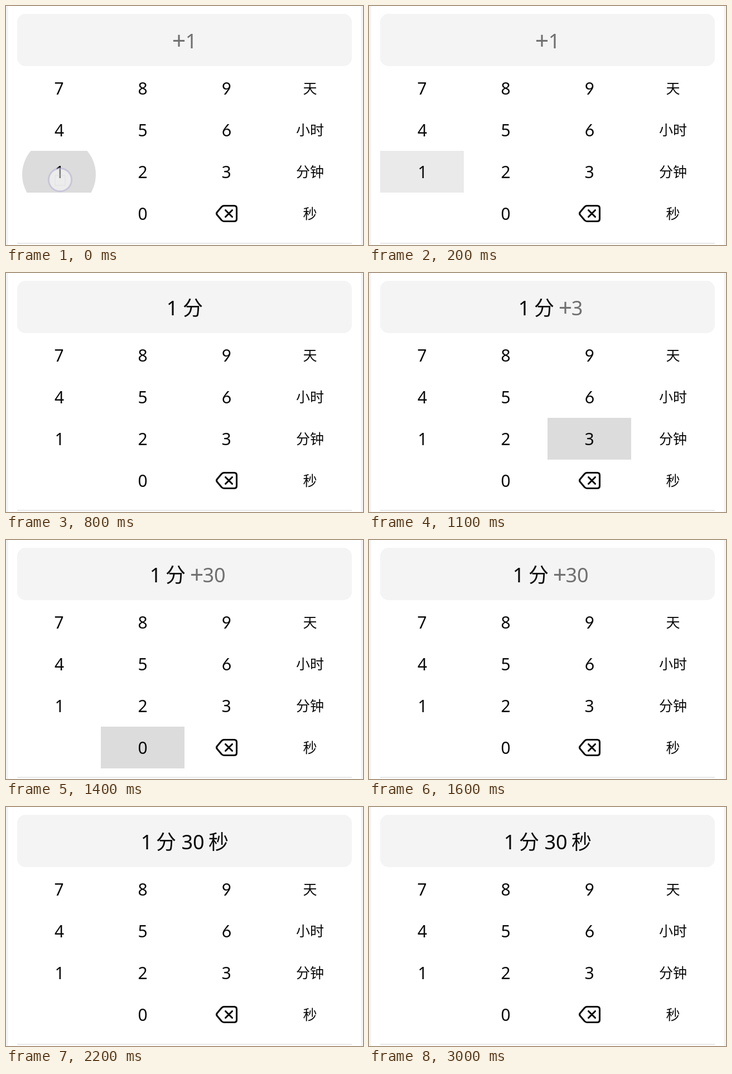
Animation, 640 px wide and 429 px high, one loop 3.1 s. Source, as an HTML page:

```html
<!DOCTYPE html>
<html lang="zh-CN">
<head>
<meta charset="utf-8">
<title>Duration keypad</title>
<style>
  html, body { margin: 0; width: 100%; height: 100%; overflow: hidden; background: #fff; }
  svg { display: block; }
  #stage { width: 100vw; height: 100vh; }

  text { text-anchor: middle; fill: #0a0a0a; font-family: "Noto Sans", "Open Sans", "Noto Sans CJK SC", sans-serif; }
  .cjk { font-family: "Noto Sans CJK SC", "Noto Sans CJK", sans-serif; }
  .keys text { font-size: 30px; }
  .keys .cjk { font-size: 25px; }
  .keys .straight { font-family: Lato, "Noto Sans", sans-serif; }
  .readout text { font-size: 36px; }
  .readout .pending { fill: #707070; }
  .readout .plus { font-size: 43px; }

  .readout g.strip { animation: readout 3100ms -5ms step-end infinite; }
  .ripple {
    r: var(--r);
    opacity: 0;
    animation: ripple 3100ms calc(var(--at) - 3105ms) step-end infinite;
  }
  .touch {
    opacity: 0;
    animation: var(--hold) 3100ms calc(var(--at) - 3105ms) step-end infinite;
  }

  /* one panel height per state */
  @keyframes readout {
    0% { transform: translateY(0); }
    16.129% { transform: translateY(-94px); }
    32.258% { transform: translateY(-188px); }
    41.935% { transform: translateY(-282px); }
    61.29%, 100% { transform: translateY(-376px); }
  }
  @keyframes ripple {
    0% { r: var(--r); fill: #dcdcdc; opacity: 1; }
    3.226% { r: 120px; fill: #dcdcdc; opacity: 1; }
    6.452% { r: 120px; fill: #eaeaea; opacity: 1; }
    9.677%, 100% { r: 120px; fill: #eaeaea; opacity: 0; }
  }
  @keyframes tap { 0% { opacity: 1; } 3.226%, 100% { opacity: 0; } }
  @keyframes press { 0% { opacity: 1; } 6.452%, 100% { opacity: 0; } }
  @keyframes linger { 0% { opacity: 1; } 9.677%, 100% { opacity: 0; } }
</style>
</head>
<body>
<svg id="stage" viewBox="0 0 640 429">
  <defs>
    <g id="finger">
      <circle r="20.5" fill="#fff" fill-opacity=".45" stroke="#b4aed2" stroke-opacity=".55" stroke-width="3"/>
      <rect x="-9" y="-8" width="18" height="18" fill="none" stroke="#ccc" stroke-opacity=".4"/>
    </g>
  </defs>

  <rect width="640" height="429" fill="#fff"/>
  <path d="M0 0H4V429H0ZM636 0H640V429H636Z" fill="#f4f4f4"/>
  <path d="M20 426H620" stroke="#e8e8e8" stroke-width="2"/>
  <rect x="20" y="14" width="600" height="94" rx="15" fill="#f4f4f4"/>

  <svg class="readout" y="14" width="640" height="94">
    <g class="strip">
      <g>
        <text class="pending plus" x="310" y="64">+</text>
        <text class="pending" x="332" y="62">1</text>
      </g>
      <g transform="translate(0 94)">
        <text x="298" y="62">1</text>
        <text class="cjk" x="335" y="62">分</text>
      </g>
      <g transform="translate(0 188)">
        <text x="278" y="62">1</text>
        <text class="cjk" x="314" y="62">分</text>
        <text class="pending plus" x="352" y="64">+</text>
        <text class="pending" x="373" y="62">3</text>
      </g>
      <g transform="translate(0 282)">
        <text x="268" y="62">1</text>
        <text class="cjk" x="304" y="62">分</text>
        <text class="pending plus" x="342" y="64">+</text>
        <text class="pending" x="373" y="62">30</text>
      </g>
      <g transform="translate(0 376)">
        <text x="252" y="62">1</text>
        <text class="cjk" x="287" y="62">分</text>
        <text x="335" y="62">30</text>
        <text class="cjk" x="381" y="62">秒</text>
      </g>
    </g>
  </svg>

  <!-- each cell clips its own ripple -->
  <svg x="20" y="259.5" width="150" height="75"><circle class="ripple" cx="75" cy="43" style="--at:0ms;--r:66px"/></svg>
  <svg x="470.5" y="259.5" width="150" height="75"><circle class="ripple" cx="73.5" cy="39.5" style="--at:500ms;--r:75px"/></svg>
  <svg x="320" y="259.5" width="150" height="75"><circle class="ripple" cx="75" cy="40" style="--at:1000ms;--r:70px"/></svg>
  <svg x="170" y="334.5" width="150" height="75"><circle class="ripple" cx="75" cy="38" style="--at:1300ms;--r:70px"/></svg>
  <svg x="470.5" y="334.5" width="150" height="75"><circle class="ripple" cx="74" cy="38" style="--at:1900ms;--r:70px"/></svg>

  <g class="keys">
    <text x="95" y="159">7</text>
    <text x="245" y="159">8</text>
    <text class="straight" x="395.5" y="159">9</text>
    <text class="cjk" x="545" y="156.5">天</text>
    <text x="95.5" y="234">4</text>
    <text x="245" y="234">5</text>
    <text class="straight" x="395.5" y="234">6</text>
    <text class="cjk" x="545" y="231.5">小时</text>
    <text x="96" y="309">1</text>
    <text x="245" y="309">2</text>
    <text x="395" y="309">3</text>
    <text class="cjk" x="545" y="306.5">分钟</text>
    <text x="245" y="384">0</text>
    <text class="cjk" x="545" y="382">秒</text>
    <path d="M391 358.5H409Q413.5 358.5 413.5 363V382Q413.5 386.5 409 386.5H391Q388.5 386.5 386.5 384.5L378.5 375Q376.5 372.5 378.5 370L386.5 360.5Q388.5 358.5 391 358.5ZM393.5 366.5L405.5 378.5M405.5 366.5L393.5 378.5"
      fill="none" stroke="#0a0a0a" stroke-width="3.1" stroke-linecap="round" stroke-linejoin="round"/>
  </g>

  <use class="touch" href="#finger" x="97" y="312" style="--at:0ms;--hold:tap"/>
  <use class="touch" href="#finger" x="536" y="320" style="--at:400ms;--hold:press"/>
  <use class="touch" href="#finger" x="395" y="318" style="--at:900ms;--hold:press"/>
  <use class="touch" href="#finger" x="245" y="371" style="--at:1200ms;--hold:press"/>
  <use class="touch" href="#finger" x="544" y="377" style="--at:1700ms;--hold:linger"/>
</svg>
</body>
</html>
```
